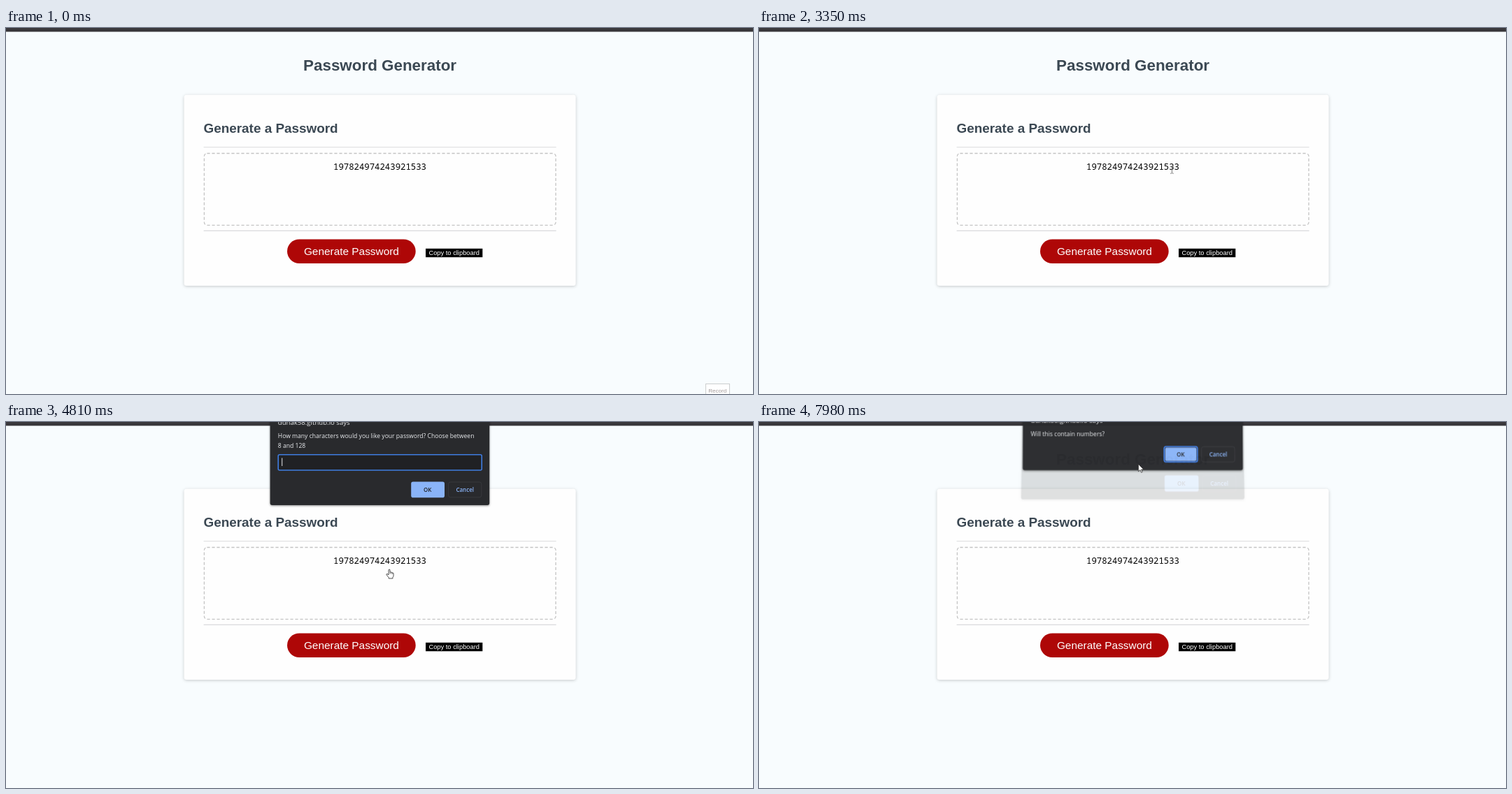
An HTML page for the animation above (8 s loop, 1068 px wide and 524 px high).

```html
<!DOCTYPE html>
<html lang="en">
<head>
<meta charset="utf-8">
<title>Password Generator</title>
<style>
  html, body { margin: 0; width: 100%; height: 100%; overflow: hidden; background: #f8fcfe; }
  #stage { position: relative; width: 100%; height: 100%; overflow: hidden; contain: strict; }
  svg { position: absolute; left: 0; top: 0; width: 1068px; height: 524px; display: block; }
  text { font-family: "Liberation Sans", Arial, sans-serif; white-space: pre; }
  .head { font-weight: bold; fill: #3b4853; }
  .card { filter: drop-shadow(0 1px 2px rgba(0, 0, 0, .2)); }
  .code { font: 12.32px "Noto Sans Mono", monospace; }
  .mid { text-anchor: middle; }
  .dialog { transform-origin: 534.5px -44px; }
  .dialog text { font-family: "Open Sans", "Noto Sans", sans-serif; font-size: 8.6px; fill: #e8eaed; }
  .dialog .panel { fill: #292a2d; filter: drop-shadow(0 1px 1.6px rgba(0, 0, 0, .45)); }
  .dialog .site { font-size: 9.6px; }
  .dialog .ok { font-size: 8px; font-weight: 600; fill: #202124; }
  .dialog .cancel { font-size: 8px; font-weight: 600; fill: #8ab4f8; }
  .dialog .digits { font-size: 8.4px; }
</style>
</head>
<body>
<div id="stage">
<svg viewBox="0 0 1068 524">
  <rect width="1068" height="524" fill="#f8fcfe"/>
  <rect width="1068" height="5.4" fill="#39373b"/>
  <text class="head mid" x="534.6" y="61.3" font-size="22.4">Password Generator</text>
  <rect class="card" x="254.6" y="95.8" width="560" height="273.2" rx="3.5" fill="#fefefe"/>
  <text class="head" x="282.5" y="149.8" font-size="18.9">Generate a Password</text>
  <rect x="282.6" y="170" width="504" height="1.2" fill="#e1e2e3"/>
  <rect x="282.6" y="289.6" width="504" height="1.4" fill="#dcdddf"/>
  <rect x="283.4" y="179.5" width="502.6" height="102.8" rx="4" fill="none"
        stroke="#c4c4c4" stroke-width="1.3" stroke-dasharray="4.2 2.8"/>
  <text class="code" x="468" y="203">197824974243921533</text>
  <rect x="402" y="302.4" width="183.7" height="34.6" rx="17.3" fill="#ae0707"/>
  <text class="mid" x="493.9" y="325" font-size="15.4" fill="#fff">Generate Password</text>
  <rect x="600" y="315.8" width="81.3" height="12.4" fill="#000"/>
  <text class="mid" x="640.7" y="325" font-size="9.33" fill="#fff">Copy to clipboard</text>
  <g id="tip">
    <rect x="1000.5" y="509.5" width="34" height="20" fill="#fff" stroke="#cbcdce"/>
    <text class="mid" x="1017.2" y="521.8" font-size="8.1" fill="#a39a9a">Record</text>
  </g>
</svg>

<svg class="dialog" id="ask" viewBox="0 0 1068 524">
  <rect class="panel" x="377.6" y="-30" width="313.6" height="149" rx="3"/>
  <text class="site" x="388.8" y="4">dunak58.github.io says</text>
  <text x="388.8" y="23.4">How many characters would you like your password? Choose between</text>
  <text x="388.8" y="37.4">8 and 128</text>
  <rect x="389.2" y="46.7" width="291" height="22.3" rx="2" fill="#202124" stroke="#3f7de0" stroke-width="1.6"/>
  <text class="digits" id="typed" x="394.3" y="60.8"></text>
  <rect id="caret" y="51.5" width="1" height="11.5" fill="#e0e2e5"/>
  <rect x="579.2" y="85.6" width="47.8" height="22.6" rx="2.8" fill="#8ab4f8"/>
  <text class="ok mid" x="602.6" y="99.8">OK</text>
  <rect x="632.6" y="86" width="47.2" height="21.8" rx="2.8" fill="none" stroke="#3b3d40" stroke-width=".8"/>
  <text class="cancel mid" x="656.2" y="99.8">Cancel</text>
</svg>

<svg class="dialog" id="next" viewBox="0 0 1068 524">
  <rect class="panel" x="377.6" y="-30" width="313.6" height="101.4" rx="3"/>
  <text class="site" x="388.8" y="4">dunak58.github.io says</text>
  <text x="388.8" y="23.2">Will this contain numbers?</text>
  <rect x="579.2" y="37.8" width="47.4" height="22" rx="2.8" fill="#202124" stroke="#4285f4" stroke-width="1.6"/>
  <rect x="580.6" y="39.2" width="44.6" height="19.2" rx="1.8" fill="#8ab4f8"/>
  <text class="ok mid" x="602.6" y="51.8">OK</text>
  <rect x="632.6" y="38" width="47.2" height="21.8" rx="2.8" fill="none" stroke="#3b3d40" stroke-width=".8"/>
  <text class="cancel mid" x="656.2" y="51.8">Cancel</text>
</svg>

<svg viewBox="0 0 1068 524">
  <g id="arrow">
    <path d="M0 0V10.6L2.5 8.3L4.2 12L5.8 11.3L4.2 7.7H7.5Z" fill="#fff" stroke="#222" stroke-width=".7"/>
  </g>
  <g id="beam">
    <path d="M-2.3 -5H-.7L0 -4.4L.7 -5H2.3M0 -4.4V4.4M-2.3 5H-.7L0 4.4L.7 5H2.3" fill="none" stroke="#777" stroke-width="1"/>
  </g>
  <g id="hand">
    <path d="M-1 .8Q0 -.6 1 .8V4.2Q2.3 3.6 2.9 4.6Q4.2 4.2 4.7 5.1Q6 5 6 6.4V9.2Q6 10.6 4.9 11.4V13.2H-.9V11.8L-4 8Q-4.4 6.6 -3 6.6L-1 8Z"
          fill="#fff" stroke="#222" stroke-width=".8" stroke-linejoin="round"/>
    <path d="M1 4.4V6.6M2.9 4.8V6.8M4.7 5.3V7" stroke="#222" stroke-width=".6"/>
  </g>
</svg>
</div>

<script>
const LOOP = 8000;
const $ = id => document.getElementById(id);
const clamp = v => Math.max(0, Math.min(1, v));
const show = (el, on) => { el.style.display = on ? "" : "none"; };
const cursors = ["arrow", "beam", "hand"];

// pointer stops: time, x, y
const stops = [
  [320, 1024, 530], [350, 1018, 514], [470, 915, 370], [590, 836, 265],
  [820, 836, 265], [1000, 770, 222], [1250, 640, 168], [1440, 560, 186], [1630, 541, 200],
  [1810, 600, 201], [2130, 507, 200], [2430, 584, 201], [2470, 584, 201],
  [2850, 482, 201], [3270, 584, 201], [3350, 590.5, 203],
  [3500, 572, 245], [3740, 528, 317], [3970, 526.5, 316],
  [4710, 526.5, 316], [4810, 548, 211], [5000, 559, 135], [5250, 555, 84],
  [5510, 546, 62], [5800, 544, 61], [6000, 543.4, 61], [7880, 543.4, 61], [7900, 542.4, 60.3]
];

function pointerAt(t) {
  const i = stops.findIndex(s => s[0] > t);
  if (i < 0) return stops[stops.length - 1].slice(1);
  if (i === 0) return [1030, 560];
  const [a, b] = [stops[i - 1], stops[i]];
  const u = (t - a[0]) / (b[0] - a[0]);
  const e = u + (u * u * (3 - 2 * u) - u) * .5;
  return [a[1] + (b[1] - a[1]) * e, a[2] + (b[2] - a[2]) * e];
}

function cursorKind(t, x, y) {
  if (t >= 7880) return "arrow";
  if (t >= 4250) {
    if (y > 119) return "hand";
    return y < 70 ? "beam" : "arrow";
  }
  if (y > 302 && y < 337 && x > 402 && x < 586) return "hand";
  return x > 283 && x < 786 && y > 179 && y < 282 ? "beam" : "arrow";
}

// tilt 1 is the raised, leaning pose; 0 is at rest
function pose(el, opacity, tilt) {
  show(el, opacity > 0);
  el.style.opacity = opacity;
  el.style.transform = tilt > 0
    ? `translateY(${-10.5 * tilt}px) perspective(1000px) rotateX(${6.5 * tilt}deg)` : "none";
}

function openDialog(el, t, start) {
  const u = clamp((t - start) / 195);
  pose(el, Math.min(1, 2.3 * u ** 1.3), 1.15 * (1 - u) ** 2);
}

function closeDialog(el, t, start) {
  const u = clamp((t - start) / 177);
  pose(el, 1 - u, 1 - (1 - u) ** 2);
}

function draw(t) {
  $("tip").style.opacity = t < 20 ? 1 : t < 60 ? .45 : 0;

  if (t < 7820) openDialog($("ask"), t, 4365);
  else closeDialog($("ask"), t, 7830);
  openDialog($("next"), t, 7880);

  const typed = t < 6850 ? "" : t < 7090 ? "1" : "10";
  const blinkFrom = t < 6850 ? 4440 : t < 7090 ? 6850 : 7090;
  const period = t < 6850 ? 520 : 540;
  $("typed").textContent = typed;
  $("caret").setAttribute("x", 394.2 + 4.8 * typed.length);
  show($("caret"), t < blinkFrom || Math.floor((t - blinkFrom) / period) % 2 === 0);

  const [x, y] = pointerAt(t);
  const kind = cursorKind(t, x, y);
  for (const id of cursors) show($(id), id === kind);
  $(kind).setAttribute("transform", `translate(${x} ${y})`);
}

function tick() {
  draw(performance.now() % LOOP);
  requestAnimationFrame(tick);
}
tick();
</script>
</body>
</html>
```
